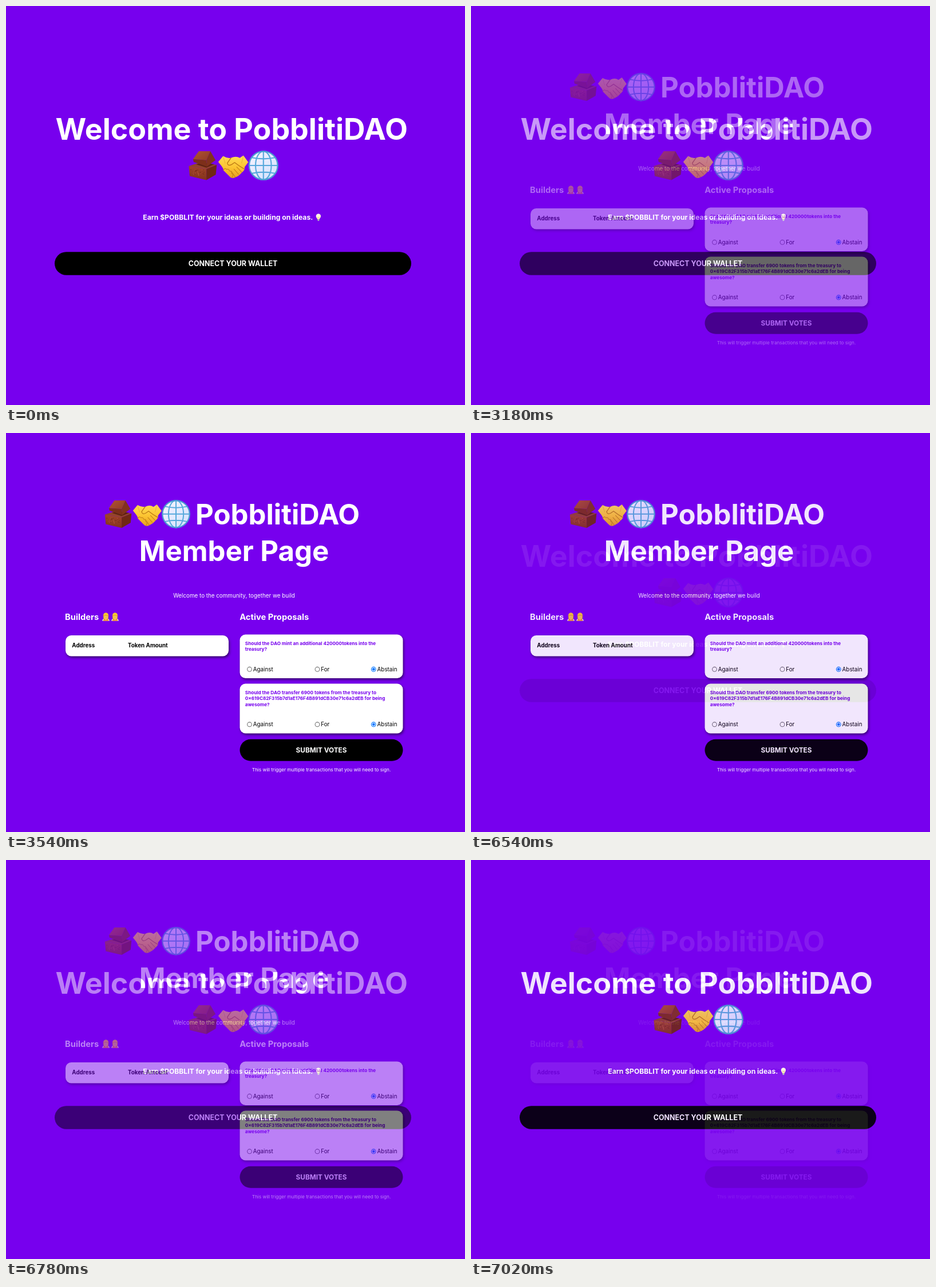
An HTML page with a canvas that plays this animation: 802x698 px, repeating every 7080 ms.

```html
<!DOCTYPE html>
<html lang="en">
<head>
<meta charset="utf-8">
<title>Member page</title>
<style>
html, body { margin: 0; width: 100%; height: 100%; overflow: hidden; background: #7700ee; }
canvas { display: block; width: 802px; height: 698px; }
</style>
</head>
<body>
<canvas id="stage"></canvas>
<script>
const W = 802, H = 698, LOOP = 7080, STEP = 60;
const PURPLE = '#7700ee';
const ratio = window.devicePixelRatio || 1;
const stage = document.getElementById('stage');
const out = sizeUp(stage);
let c;

function sizeUp(canvas) {
  canvas.width = Math.round(W * ratio);
  canvas.height = Math.round(H * ratio);
  return canvas.getContext('2d');
}

function scene(draw) {
  const canvas = document.createElement('canvas');
  c = sizeUp(canvas);
  c.scale(ratio, ratio);
  c.fillStyle = PURPLE;
  c.fillRect(0, 0, W, H);
  draw();
  return canvas;
}

function text(str, x, y, size, weight = 700, color = '#fff', align = 'left') {
  c.font = `${weight} ${size}px Inter, sans-serif`;
  c.textAlign = align;
  c.fillStyle = color;
  c.fillText(str, x, y);
}

function box(x, y, w, h, r, color) {
  c.fillStyle = color;
  c.beginPath();
  c.roundRect(x, y, w, h, r);
  c.fill();
}

function card(x, y, w, h) {
  c.save();
  c.shadowColor = 'rgba(0,0,0,.55)';
  c.shadowOffsetX = 1.5 * ratio;
  c.shadowOffsetY = 2.5 * ratio;
  c.shadowBlur = 4 * ratio;
  box(x, y, w, h, 10, '#fff');
  c.restore();
}

function disc(x, y, r, fill, stroke, width = 1) {
  c.beginPath();
  c.arc(x, y, r, 0, 7);
  if (fill) { c.fillStyle = fill; c.fill(); }
  if (stroke) { c.strokeStyle = stroke; c.lineWidth = width; c.stroke(); }
}

function shape(d, fill) {
  c.fillStyle = fill;
  c.fill(new Path2D(d));
}

function line(d, stroke, width) {
  c.strokeStyle = stroke;
  c.lineWidth = width;
  c.stroke(new Path2D(d));
}

function fade(x0, y0, x1, y1, ...colors) {
  const g = c.createLinearGradient(x0, y0, x1, y1);
  colors.forEach((color, i) => g.addColorStop(i / (colors.length - 1), color));
  return g;
}

// Icons are drawn on a 100 x 100 grid.
function icon(draw, x, y, size) {
  c.save();
  c.translate(x, y);
  c.scale(size / 100, size / 100);
  c.lineCap = c.lineJoin = 'round';
  draw();
  c.restore();
}

function bricks() {
  shape('M4 52 L40 40 L96 48 L62 62 Z', '#94432b');
  shape('M28 46 L50 40 L88 46 L62 57 Z', '#5e2212');
  shape('M4 52 L62 62 L62 98 L7 85 Z', fade(0, 52, 0, 98, '#a24429', '#83331d'));
  shape('M62 62 L96 48 L93 80 L62 98 Z', '#702814');
  shape('M18 29 L62 32 L64 54 L20 38 Z', '#7d2f1a');
  shape('M18 29 L37 3 L75 3 L62 32 Z', fade(30, 4, 50, 32, '#ac4f33', '#994128'));
  shape('M75 3 L92 32 L64 54 L62 32 Z', '#82321d');
  let seed = 7;
  const rnd = () => (seed = seed * 16807 % 2147483647) / 2147483647;
  for (let i = 0; i < 26; i++) {
    const x = 8 + rnd() * 49, y = 57 + x * .12 + rnd() * 22;
    disc(x, y, .8 + rnd(), i % 2 ? '#b9593a' : '#742a17');
  }
}

function handshake() {
  shape('M1 38 L17 19 Q30 27 43 25 Q59 17 72 25 L84 17 L100 39 L88 55 Q89 66 79 73 Q69 85 57 89 Q46 96 37 85 L19 67 Q17 58 12 52 Z',
    fade(0, 18, 0, 94, '#ffdb55', '#fcc431', '#e79f20'));
  line('M43 25 L31 42 Q33 53 45 47 L55 40 Q70 52 86 61', '#bd7b16', 2.6);
  line('M62 55 L78 72 M53 62 L68 79 M44 69 L57 88', '#c98719', 2.3);
  line('M18 65 Q23 56 29 63 Q36 60 38 68 Q46 68 45 76 Q53 78 47 89', '#c98719', 2.4);
  line('M17 20 L24 43 M84 18 L78 42', 'rgba(200,130,20,.35)', 2);
}

function globe() {
  const blue = '#58a9dc';
  disc(50, 50, 47, fade(15, 10, 85, 95, '#f5f2ff', '#e4eaff', '#d3e1fc'));
  c.beginPath();
  c.ellipse(50, 50, 26, 47, 0, 0, 7);
  c.strokeStyle = blue;
  c.lineWidth = 4;
  c.stroke();
  line('M50 3 V97 M3 50 H97 M12 24 Q50 32 88 24 M12 76 Q50 68 88 76', blue, 4);
  disc(50, 50, 47, null, '#4b9bd3', 4.4);
}

function bulb() {
  shape('M50 3 C27 3 14 23 19 42 C23 55 33 62 36 76 L64 76 C67 62 77 55 81 42 C86 23 73 3 50 3 Z',
    fade(20, 0, 80, 80, '#fffdf0', '#fff3c4'));
  line('M43 74 L38 46 L50 53 L62 46 L57 74', '#e2b750', 4);
  shape('M37 76 H63 L61 94 Q50 104 39 94 Z', '#b7b8c2');
  line('M38 83 H62', '#777986', 4);
}

function worker() {
  shape('M8 99 Q8 73 35 70 H65 Q92 73 92 99 Z', '#dbe1e8');
  shape('M17 99 L28 71 H40 L50 86 L60 71 H72 L83 99 Z', '#f18a32');
  shape('M22 36 Q16 68 29 76 H71 Q84 68 78 36 Z', '#e4a928');
  shape('M28 37 H72 Q77 77 50 80 Q23 77 28 37 Z', '#ffd65b');
  shape('M20 37 Q20 3 50 2 Q80 3 80 37 Q50 28 20 37 Z', '#f8c82e');
  line('M17 38 Q50 27 83 38', '#dda21b', 5);
  disc(40, 51, 3.5, '#5d4020');
  disc(60, 51, 3.5, '#5d4020');
  line('M42 66 Q50 71 58 66', '#a65a26', 3);
}

function emblem(x, y, size) {
  [bricks, handshake, globe].forEach((draw, i) => icon(draw, x + i * size, y, size));
}

function radio(label, x, y, size, on) {
  disc(x, y, 3.9, '#fff', on ? '#0075ff' : '#767676', 1.1);
  if (on) disc(x, y, 2.4, '#0075ff');
  text(label, x + 6.3, y + 3.6, size, 400, '#000');
}

function proposal(y, h, em, lines) {
  card(408.5, y, 285, h);
  lines.forEach((str, i) => text(str, 417.8, y + 18 + i * 10.5, .83 * em, 700, PURPLE));
  const mid = y + h - 15.7;
  radio('Against', 425.5, mid, em, false);
  radio('For', 544, mid, em, false);
  radio('Abstain', 642.3, mid, em, true);
}

// Each page is 60 em wide.
function landing() {
  const em = 623 / 60;
  text('Welcome to PobblitiDAO', 86.5, 234, 5 * em);
  emblem(317.3, 252.5, 53);
  text('Earn $POBBLIT for your ideas or building on ideas.', 239.3, 374.2, 1.17 * em);
  icon(bulb, 539.4, 363.2, 13);
  box(85, 430.2, 623, 40.5, 20.25, '#000');
  text('CONNECT YOUR WALLET', 396.5, 454.7, 1.2 * em, 700, '#fff', 'center');
}

function members() {
  const em = 589.5 / 60;
  emblem(170.8, 116.5, 50.5);
  text('PobblitiDAO', 331, 160, 5 * em);
  text('Member Page', 398.5, 223.5, 5 * em, 700, '#fff', 'center');
  text('Welcome to the community, together we build', 398.5, 287.6, em, 400, '#fff', 'center');

  text('Builders', 103, 327, 1.5 * em);
  icon(worker, 167, 314, 15);
  icon(worker, 183, 314, 15);
  text('Active Proposals', 408.2, 327, 1.5 * em);

  card(104, 354, 285, 36.5);
  text('Address', 115.3, 375.4, em, 700, '#000');
  text('Token Amount', 213, 375.4, em, 700, '#000');

  proposal(352.5, 76.5, em, [
    'Should the DAO mint an additional 420000tokens into the',
    'treasury?'
  ]);
  proposal(438.5, 87, em, [
    'Should the DAO transfer 6900 tokens from the treasury to',
    '0×619C82F315b7d1aE176F4B891dCB30e71c6a2dEB for being',
    'awesome?'
  ]);

  box(408.5, 535.8, 285, 38, 19, '#000');
  text('SUBMIT VOTES', 551, 559.2, 1.2 * em, 700, '#fff', 'center');
  text('This will trigger multiple transactions that you will need to sign.',
    551, 591.7, .833 * em, 400, '#fff', 'center');
}

const first = scene(landing);
const second = scene(members);

// Share of the second page: a stepped cross-fade each way.
function mix(t) {
  const ramp = start => Math.min(1, Math.max(0, (Math.floor((t - start) / STEP) + 1) / 10));
  return ramp(3000) - ramp(6540);
}

function frame(now) {
  out.globalAlpha = 1;
  out.drawImage(first, 0, 0);
  out.globalAlpha = mix(now % LOOP);
  out.drawImage(second, 0, 0);
  requestAnimationFrame(() => frame(performance.now() - begin));
}

const begin = performance.now();
frame(0);
</script>
</body>
</html>
```
